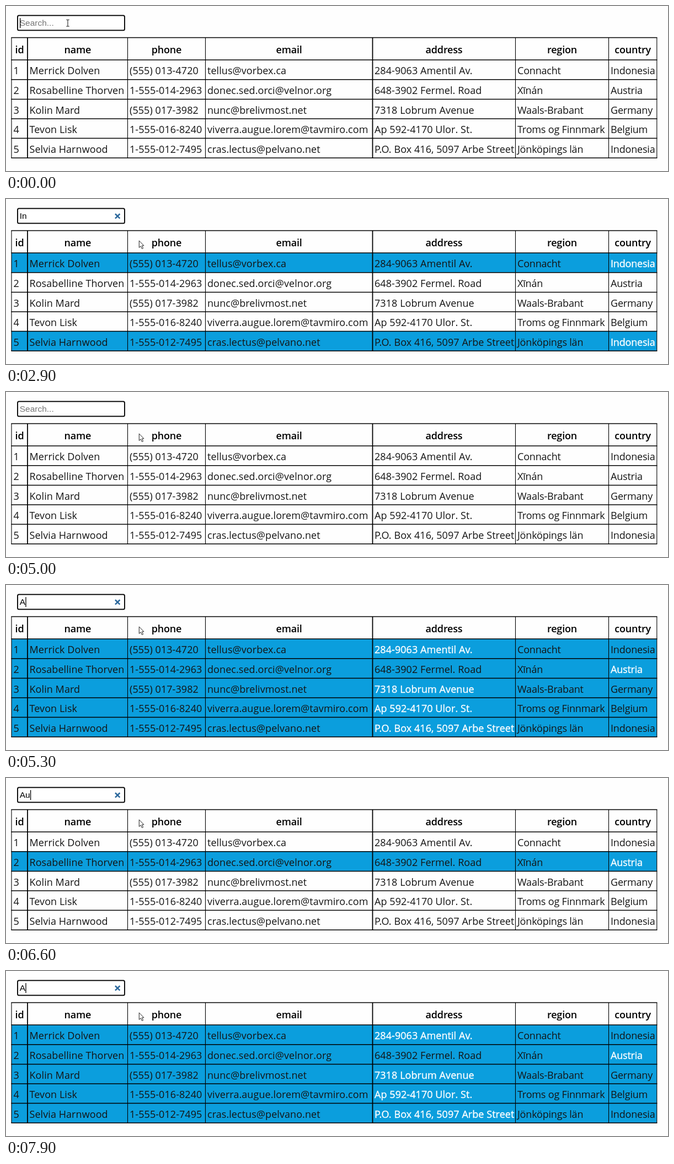
Recreate the animation shown at these times as an HTML page. Size 1200 by 300 pixels, loop 8000 ms.

```html
<!DOCTYPE html>
<html lang="en">
<head>
<meta charset="utf-8">
<title>Table search</title>
<style>
  html, body { margin: 0; width: 100%; height: 100%; overflow: hidden; background: #fefefe; }
  svg { display: block; width: 100%; height: 100%; }
  .cell, .head { font: 18px "Open Sans", "Noto Sans", sans-serif; letter-spacing: -0.2px; fill: #141414; }
  .head { font-weight: 600; text-anchor: middle; fill: #000; }
  .cell.name, .cell.phone, .cell.email, .cell.address { letter-spacing: 0.06px; }
  .cell.hit { fill: #fff; stroke: #fff; stroke-width: 0.35px; }
  .field { font: 15.5px "Liberation Sans", Arial, sans-serif; }
</style>
</head>
<body>
<svg id="stage" viewBox="0 0 1200 300"></svg>
<script>
const LOOP = 8000, STEP = 100, BLINK = 450;
const NS = "http://www.w3.org/2000/svg";
const stage = document.getElementById("stage");

const heads = ["id", "name", "phone", "email", "address", "region", "country"];
const cols = [10, 39, 220.5, 361.5, 664.5, 923.5, 1092.5, 1179.8];
const lines = [57.5, 98, 133.8, 169.4, 205, 240.6, 276.3];
const people = [
  ["1", "Merrick Dolven", "(555) 013-4720", "tellus@vorbex.ca", "284-9063 Amentil Av.", "Connacht", "Indonesia"],
  ["2", "Rosabelline Thorven", "1-555-014-2963", "donec.sed.orci@velnor.org", "648-3902 Fermel. Road", "Xīnán", "Austria"],
  ["3", "Kolin Mard", "(555) 017-3982", "nunc@brelivmost.net", "7318 Lobrum Avenue", "Waals-Brabant", "Germany"],
  ["4", "Tevon Lisk", "1-555-016-8240", "viverra.augue.lorem@tavmiro.com", "Ap 592-4170 Ulor. St.", "Troms og Finnmark", "Belgium"],
  ["5", "Selvia Harnwood", "1-555-012-7495", "cras.lectus@pelvano.net", "P.O. Box 416, 5097 Arbe Street", "Jönköpings län", "Indonesia"]
];

// Search box contents; each edit also restarts the caret blink.
const edits = [
  [150, ""], [1800, "I"], [2300, "In"], [4100, "I"], [4500, ""],
  [5300, "A"], [6600, "Au"], [7900, "A"]
];

function add(tag, attrs, text) {
  const node = document.createElementNS(NS, tag);
  for (const key in attrs) node.setAttribute(key, attrs[key]);
  if (text) node.textContent = text;
  stage.append(node);
  return node;
}

function show(node, on) {
  node.setAttribute("visibility", on ? "visible" : "hidden");
}

const left = cols[0], right = cols[cols.length - 1];

const rows = people.map((values, r) => {
  const top = lines[r + 1];
  const band = add("rect", { x: left, y: top, width: right - left, height: lines[r + 2] - top, fill: "#0b9edd" });
  const cells = values.map((value, c) => ({
    value,
    node: add("text", { x: cols[c] + 3.5, y: top + 26.3, class: "cell " + heads[c] }, value)
  }));
  return { band, cells };
});

heads.forEach((title, c) =>
  add("text", { x: (cols[c] + cols[c + 1]) / 2, y: 86.3, class: "head" }, title));

for (const y of lines)
  add("line", { x1: left - 0.6, x2: right + 0.6, y1: y, y2: y, stroke: "#000", "stroke-width": 1.5 });
cols.forEach((x, c) =>
  add("line", { x1: x, x2: x, y1: lines[0], y2: lines[6], stroke: "#000", "stroke-width": c === 1 || c === 4 ? 1.8 : 1.1 }));

add("rect", { x: 21, y: 17.3, width: 194, height: 27, rx: 2.5, fill: "#fff", stroke: "#101010", "stroke-width": 2 });
const hint = add("text", { x: 24.7, y: 36, class: "field", fill: "#757575" }, "Search...");
const typed = add("text", { x: 24.7, y: 36, class: "field", fill: "#000" });
const caret = add("rect", { y: 22, width: 1.3, height: 18, fill: "#000" });
const clear = add("path", { d: "M198 27l8.4 8.4m0-8.4l-8.4 8.4", stroke: "#2b689c", "stroke-width": 2.5, fill: "none" });

const beam = add("path", {
  d: "M-2.8-6h2l.8.6.8-.6h2M0-5.4v10.8M-2.8 6h2l.8-.6.8.6h2",
  stroke: "#222", "stroke-width": 1.1, fill: "none"
});
const arrow = add("path", {
  d: "M0 0v12.6l2.9-2.7 2.3 4.8 2.1-1-2.2-4.6h3.6z",
  stroke: "#222", "stroke-width": 1, fill: "#fff"
});

function drawField(text, age) {
  hint.textContent = text ? "" : "Search...";
  typed.textContent = text;
  caret.setAttribute("x", 25 + (text ? typed.getComputedTextLength() : 0));
  show(caret, Math.floor(Math.max(0, age) / BLINK) % 2 === 0);
  show(clear, text !== "");
}

function drawRows(text) {
  for (const { band, cells } of rows) {
    let any = false;
    for (const { value, node } of cells) {
      const hit = text !== "" && value.includes(text);
      node.classList.toggle("hit", hit);
      any = any || hit;
    }
    show(band, any);
  }
}

function drawPointer(t) {
  const p = Math.min(1, t / 400);
  const x = 112 + 129.3 * p, y = 31 + 44.8 * p;
  const inField = x < 216 && y < 45;
  for (const node of [beam, arrow]) node.setAttribute("transform", `translate(${x} ${y})`);
  show(beam, inField);
  show(arrow, !inField);
}

function render(ms) {
  const t = Math.floor((ms % LOOP) / STEP) * STEP;
  const [start, text] = edits.filter(e => e[0] <= t).pop() || edits[0];
  drawField(text, t - start);
  drawRows(text);
  drawPointer(t);
}

const begin = performance.now();
function tick() {
  render(performance.now() - begin);
  requestAnimationFrame(tick);
}
tick();
</script>
</body>
</html>
```
